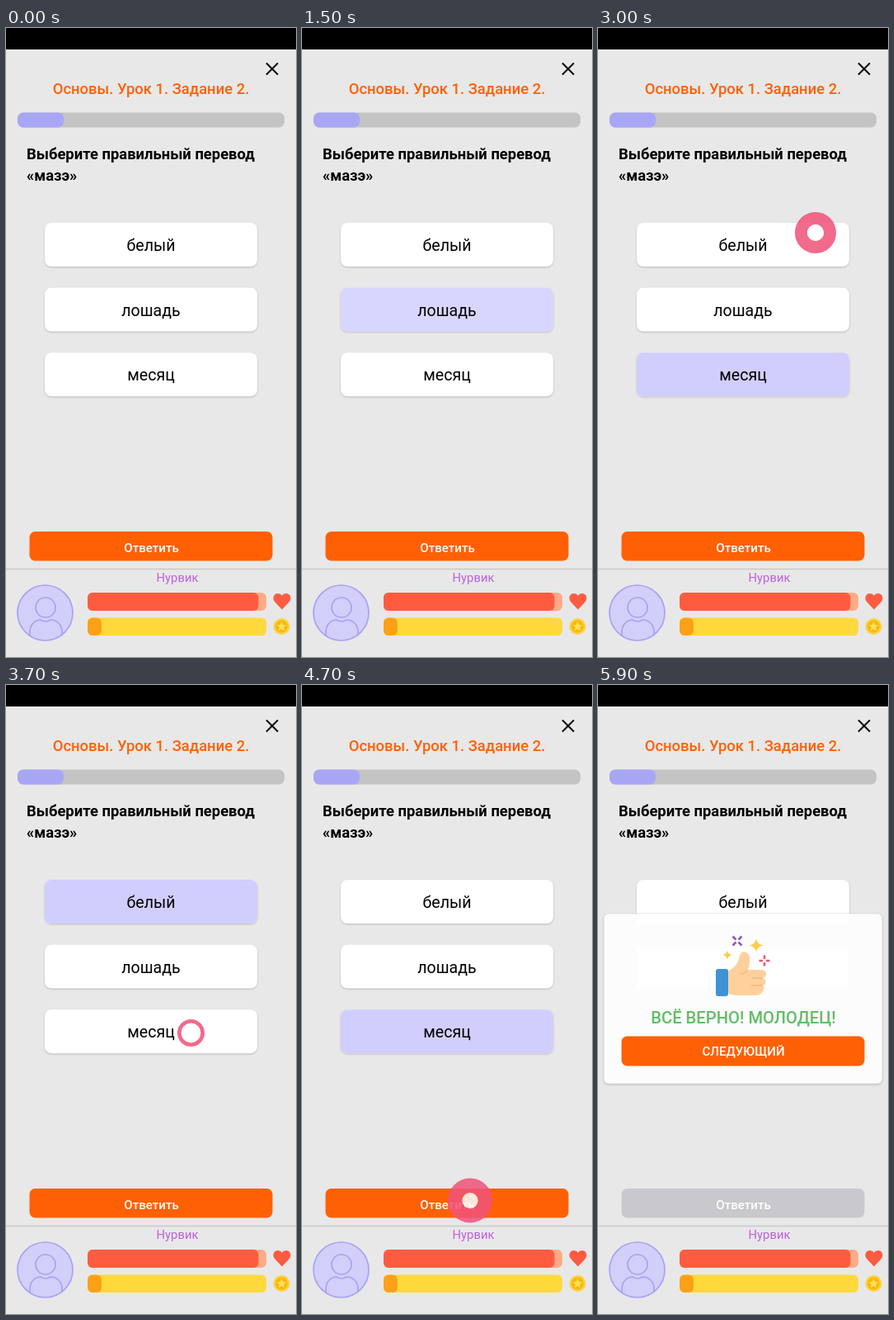
Animation, 352 px wide and 762 px high, one loop 6000 ms. Source, as an HTML page:

```html
<!DOCTYPE html>
<html lang="ru">
<head>
<meta charset="utf-8">
<title>Урок</title>
<style>
  html, body { margin: 0; width: 100%; height: 100%; overflow: hidden; background: #e8e8e8; }
  svg { display: block; width: 100vw; height: 100vh; }
  text { font-family: Roboto, "Open Sans", sans-serif; text-anchor: middle; }
  .head { font-size: 18.4px; font-weight: 700; text-anchor: start; }
  .option { font-size: 19.6px; }
  .button { font-size: 15.1px; font-weight: 500; fill: #fff; }
  .line { fill: none; stroke: #a8a2f3; stroke-width: 1.7; }
  .raised { filter: drop-shadow(0 1px 1px #0003); }
</style>
</head>
<body>
<svg viewBox="0 0 352 762">
  <rect width="352" height="762" fill="#e8e8e8"/>
  <rect width="352" height="26"/>
  <path d="M316 42.5l14 14m0-14l-14 14" stroke="#000" stroke-width="2"/>
  <text x="176" y="80" font-size="18.4" font-weight="500" fill="#ff6004">Основы. Урок 1. Задание 2.</text>
  <rect x="14" y="102.5" width="324" height="18" rx="7" fill="#c4c4c4"/>
  <rect x="14" y="102.5" width="56" height="18" rx="7" fill="#a9a6f5"/>
  <text class="head" x="25" y="159">Выберите правильный перевод</text>
  <text class="head" x="25" y="185">«мазэ»</text>

  <g id="options"></g>

  <rect id="answer" x="28.5" y="610" width="295" height="35.5" rx="7"/>
  <text class="button" x="176.5" y="635">Ответить</text>

  <path d="M0 655.5H352" stroke="#c9c9c9" stroke-width="1.5"/>
  <text x="208" y="670.5" font-size="14.8" fill="#bd62dc">Нурвик</text>
  <circle class="line" cx="47.5" cy="708.5" r="33.5" style="fill:#d2cffa"/>
  <circle class="line" cx="48" cy="702" r="12"/>
  <path class="line" d="M29 736V732C29 722 36 717 42 717Q48 721 54 717C61 717 68 722 68 732V736"/>
  <rect x="99" y="684" width="217" height="22" rx="6" fill="#ffac86"/>
  <rect x="99" y="684" width="207.5" height="22" rx="6" fill="#ff5b41"/>
  <rect x="99" y="714.5" width="217" height="21.5" rx="6" fill="#ffd93b"/>
  <rect x="99" y="714.5" width="17" height="21.5" rx="6" fill="#ffa116"/>
  <path d="M335 704.5L326.5 695.5C322 690 326 685 330 685Q333.5 685 335 688Q336.500 685 340 685C344 685 348 690 343.5 695.5Z" fill="#ff5b41"/>
  <circle cx="334.500" cy="725" r="10" fill="#ffd23c"/>
  <circle cx="334.500" cy="725" r="7.5" fill="#f4b81a"/>
  <path d="M334.500 719l1.700 4 4.300.3-3.300 2.800 1.100 4.200-3.800-2.300-3.800 2.300 1.100-4.200-3.300-2.800 4.300-.3z" fill="#ffe14e"/>

  <g id="panel">
    <rect class="raised" x="7" y="277" width="338" height="206" rx="6" fill="#fcfcfc" stroke="#dedede" stroke-width=".7"/>
    <path d="M48 277.500H304V289H48zM48 320H303V366H48z" fill="#fff"/>
    <path d="M156 347C164 345 170 338 172 328C173 321 182 322 184 329Q185 335 182 345H199Q205 346 204 351Q203 355 200 355Q205 357 203 362Q202 364 200 364Q203 367 200 371Q198 376 190 376H168Q162 376 156 372Z" fill="#ffd09c"/>
    <path d="M187 355H200M186 364H200M182 345Q178 350 172 350" fill="none" stroke="#f2b888" stroke-width="1.300"/>
    <rect x="143" y="344" width="15" height="33" rx="3" fill="#3d93d6"/>
    <g id="stars" fill="#fbcf4c"></g>
    <path d="M163.500 304.500l4 4m3 3l4 4m0-11l-4 4m-3 3l-4 4" stroke="#8a5db6" stroke-width="2.600"/>
    <path d="M202 327.500v4.500m0 4v4.500m-6.500-6.500h4.500m4 0h4.500" stroke="#f0566c" stroke-width="2.600"/>
    <text x="176.500" y="409.500" font-size="20.2" font-weight="500" fill="#62bd66">ВСЁ ВЕРНО! МОЛОДЕЦ!</text>
    <rect x="28.500" y="425.500" width="295" height="36" rx="7" fill="#ff6004"/>
    <text class="button" x="176.500" y="449">СЛЕДУЮЩИЙ</text>
  </g>

  <g id="touch">
    <circle id="ring" fill="none" stroke="#f0527a" stroke-opacity=".86"/>
    <circle id="core" fill="#fff" fill-opacity=".85"/>
  </g>
</svg>
<script>
const LOOP = 6000, STEP = 100;
const $ = id => document.getElementById(id);
const clamp = v => Math.max(0, Math.min(1, v));
const mix = (a, b, k) => a + (b - a) * k;
const set = (el, attrs) => { for (const k in attrs) el.setAttribute(k, attrs[k]); };

// Row -1 is the answer button
const taps = [
  { at: 1300, x: 272, y: 322, row: 1 },
  { at: 2300, x: 250, y: 415, row: 2 },
  { at: 2900, x: 264, y: 248, row: 0 },
  { at: 3685, x: 224.5, y: 421.5, row: 2 },
  { at: 4580, x: 204, y: 624.5, row: -1 },
];

$('options').innerHTML = ['белый', 'лошадь', 'месяц'].map((word, i) => {
  const y = 236 + i * 78.6;
  const box = `x="47" y="${y}" width="258" height="53" rx="8"`;
  return `<rect class="raised" ${box} fill="#fff"/>
    <rect class="mark" ${box} fill="#d1cefe"/>
    <text class="option" x="176" y="${y + 34}">${word}</text>`;
}).join('');
const marks = document.querySelectorAll('.mark');

const star = (x, y, r) =>
  `<path d="M${x} ${y - r}Q${x + 1} ${y - 1} ${x + r} ${y}Q${x + 1} ${y + 1} ${x} ${y + r}Q${x - 1} ${y + 1} ${x - r} ${y}Q${x - 1} ${y - 1} ${x} ${y - r}"/>`;
$('stars').innerHTML = star(192, 315.5, 8.5) + star(157, 327, 5.5);

function drawTouch(t) {
  const tap = taps.find(p => t >= p.at && t < p.at + 150);
  set($('touch'), { visibility: tap ? 'visible' : 'hidden' });
  if (!tap) return;
  const age = t - tap.at;
  const outer = 15 + age * 0.1, inner = 12 - age * 0.02;
  set($('touch'), { transform: `translate(${tap.x} ${tap.y})` });
  set($('ring'), { r: (outer + inner) / 2, 'stroke-width': outer - inner });
  set($('core'), { r: inner });
}

function draw(t) {
  marks.forEach((mark, i) => {
    const level = taps.filter(p => p.row >= 0).reduce(
      (v, p) => mix(v, p.row === i ? 1 : 0, clamp((t - p.at - 100) / 120)), 0);
    set(mark, { opacity: level });
  });
  const done = clamp((t - 4700) / 350);
  const tone = [[255, 201], [96, 201], [4, 205]].map(([a, b]) => Math.round(mix(a, b, done)));
  set($('answer'), { fill: `rgb(${tone})` });
  set($('panel'), { opacity: done });
  drawTouch(t);
}

const start = performance.now();
function tick() {
  const t = (performance.now() - start) % LOOP;
  draw(Math.floor(t / STEP) * STEP);
  requestAnimationFrame(tick);
}
tick();
</script>
</body>
</html>
```
